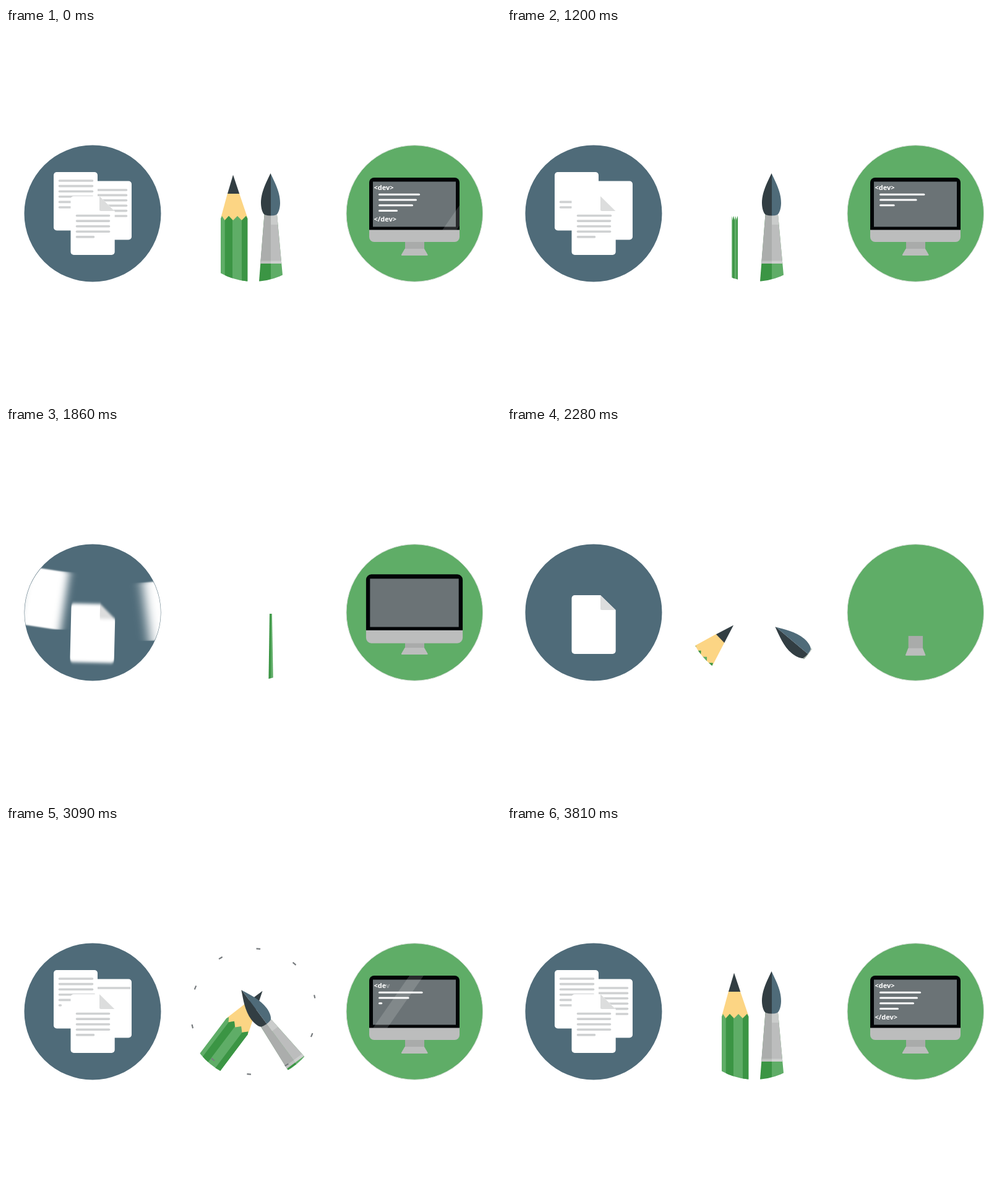
An HTML page that plays this animation: 800 by 600 pixels, repeating every 4500 ms.

```html
<!DOCTYPE html>
<html lang="en">
<head>
<meta charset="utf-8">
<title>Content, design, development</title>
<style>
  html, body { margin: 0; width: 100%; height: 100%; overflow: hidden; background: #fff; }
  svg { display: block; width: 100vw; height: 100vh; }
  .rules line { stroke: #cfd1d2; stroke-width: 3.6; stroke-linecap: round; }
  .code line { stroke: #fff; stroke-width: 3; stroke-linecap: round; }
  .code text { font: bold 11px "Open Sans", "Noto Sans", sans-serif; fill: #fff; }
  .burst { fill: none; stroke: #777b7e; stroke-width: 2.2; }
</style>
</head>
<body>
<svg viewBox="0 0 800 600">
  <defs>
    <clipPath id="leftDisc"><circle cx="140" cy="300" r="110"/></clipPath>
    <clipPath id="midDisc"><circle cx="400" cy="300" r="110"/></clipPath>
    <clipPath id="handleShape"><path d="M417.5 302H438L448 411H408.5Z"/></clipPath>
    <clipPath id="bezelShape"><path id="bezelPath" d="M587 326.500V250a8 8 0 0 1 8-8H725a8 8 0 0 1 8 8V326.500Z"/></clipPath>
    <filter id="blur1" filterUnits="userSpaceOnUse" x="-100" y="100" width="500" height="450"><feGaussianBlur stdDeviation="0"/></filter>
    <filter id="blur2" filterUnits="userSpaceOnUse" x="-100" y="100" width="500" height="450"><feGaussianBlur stdDeviation="0"/></filter>
    <filter id="blur3" filterUnits="userSpaceOnUse" x="-100" y="100" width="500" height="450"><feGaussianBlur stdDeviation="0"/></filter>
  </defs>

  <circle cx="140" cy="300" r="110.5" fill="#4f6b79"/>
  <g clip-path="url(#leftDisc)">
    <g id="sheet2">
      <g class="pose"><rect x="132" y="247.500" width="71" height="95" rx="5" fill="#fff"/><g class="rules"></g></g>
    </g>
    <g id="sheet1">
      <g class="pose"><rect x="77" y="233" width="71" height="94.500" rx="5" fill="#fff"/><g class="rules"></g></g>
    </g>
    <g id="sheet3">
      <g class="pose">
        <path d="M109.500 272H151L175.700 296V362a5 5 0 0 1-5 5H109.500a5 5 0 0 1-5-5V277a5 5 0 0 1 5-5Z" fill="#fff"/>
        <path d="M151 272L175.300 296H153a2 2 0 0 1-2-2Z" fill="#dcdddd"/>
        <g class="rules"></g>
      </g>
    </g>
  </g>

  <g clip-path="url(#midDisc)">
    <g id="pencil">
      <g id="pencilHead">
        <path d="M358 267.500H377L390 306L384 314H352L347.500 306Z" fill="#fcd584"/>
        <path d="M367 237.500L377.200 268H358Z" fill="#323e43"/>
      </g>
      <g id="pencilBody">
        <path id="shaft" d="M347 308V570H390.300V308L388 304L381 311L374 304L367 311L360 304L353.500 311L349 304Z" fill="#5fad67"/>
        <path d="M353.700 311L360 304L366 310.500V570H353.700ZM381 311L388 304L390.300 308V570H381Z" fill="#3b9544"/>
      </g>
    </g>
    <g id="brush">
      <g id="handle">
        <path d="M417.500 302H428V600H394Z" fill="#3b9544"/>
        <path d="M428 302H438L465.500 600H428Z" fill="#5fad67"/>
      </g>
      <g id="ferruleClip">
        <g id="ferrule">
          <path d="M417.500 302H428V381H411Z" fill="#abadac"/>
          <path d="M428 302H438L445.300 381H428Z" fill="#bcbdbd"/>
          <path d="M428 302H438L439.500 318H428Z" fill="#cacccb"/>
          <path d="M411.600 376.500H428V381H411.200Z" fill="#bfc1c0"/>
          <path d="M428 376.500H444.900L445.300 381H428Z" fill="#cdcfce"/>
        </g>
      </g>
      <g id="brushHead">
        <path d="M427.500 235C421 249 412 265 412 283C412 292 415 300 418 302Q423 303.500 428 303.500V236Z" fill="#323e43"/>
        <path d="M427.500 235C434 249 443 265 443 283C443 292 440 300 437 302Q433 303.500 428 303.500V236Z" fill="#4f6b79"/>
      </g>
    </g>
    <circle id="burst" class="burst" cx="400" cy="300" r="0"/>
  </g>

  <circle cx="660.300" cy="300" r="110.300" fill="#5fad67" stroke="#d3dcd4" stroke-width="1"/>
  <g id="stand">
    <path d="M645 339H676V358H645Z" fill="#a9abaa"/>
    <path d="M644.500 357H676L681.500 366.500Q682 368 680.500 368H640Q638.500 368 639 366.500Z" fill="#bcbdbd"/>
  </g>
  <g id="monitor">
    <rect x="587" y="300" width="146" height="46" rx="8" fill="#bcbdbd"/>
    <use href="#bezelPath" fill="#020507"/>
    <rect x="593" y="248.500" width="134" height="73" fill="#6b7376"/>
    <g class="code">
      <text x="594.500" y="262" id="openTag"></text>
      <g id="codeLines"></g>
      <text x="594.500" y="313" id="closeTag"></text>
    </g>
    <g clip-path="url(#bezelShape)"><path id="glare" d="M0 327H23L82 242H59Z" fill="#fff" opacity=".15"/></g>
  </g>
</svg>
<script>
const LOOP = 4500, STEP = 30, BACK = 1.70158;
const $ = id => document.getElementById(id);
const progress = (t, start, length) => Math.min(1, Math.max(0, (t - start) / length));
const backIn = p => p * p * ((BACK + 1) * p - BACK);
const backOut = p => 1 - backIn(1 - p);
const cubicOut = p => 1 - (1 - p) ** 3;
const mix = (a, b, p) => a + (b - a) * p;

// 1 while at rest, 0 while away; anticipates on leaving, overshoots on return
const presence = (t, leave, leaveLength, enter, enterLength) =>
  t < enter ? 1 - backIn(progress(t, leave, leaveLength)) : backOut(progress(t, enter, enterLength));

const place = (el, transform) => el.setAttribute('transform', transform);
const scaleAt = (x, y, sx, sy = sx) => `translate(${x} ${y}) scale(${sx} ${sy}) translate(${-x} ${-y})`;
const show = (el, on) => el.setAttribute('visibility', on ? 'visible' : 'hidden');

function makeElement(parent, name, attrs) {
  const el = document.createElementNS('http://www.w3.org/2000/svg', name);
  for (const key in attrs) el.setAttribute(key, attrs[key]);
  return parent.appendChild(el);
}

const strokes = [];
function addStrokes(parent, x, y, gap, lengths, leaves, enters) {
  lengths.forEach((length, i) => {
    const lineY = y + gap * i;
    const el = makeElement(parent, 'line', { x1: x, x2: x, y1: lineY, y2: lineY });
    strokes.push({ el, x, length, leave: leaves[i], enter: enters[i] });
  });
}
const series = (first, gap, n) => Array.from({ length: n }, (_, i) => first + gap * i);

const letters = [];
function addLetters(id, text, leave, enter) {
  [...text].forEach((char, i) => {
    const el = makeElement($(id), 'tspan', {});
    el.textContent = char;
    letters.push({ el, leave: leave - 60 * i, enter: enter + 60 * i });
  });
}

const rules = n => document.querySelector(`#sheet${n} .rules`);
addStrokes(rules(1), 86.5, 247, 8.6, [53, 53, 53, 53, 53, 18],
  [747, 598, 765, 850, 930, 1000], [2600, 2690, 2780, 2860, 2955, 3083]);
addStrokes(rules(2), 141.5, 262, 8.4, [53, 53, 53, 53, 53, 53],
  [580, 410, 480, 747, 830, 910], [2916, ...series(3085, 80, 5)]);
addStrokes(rules(3), 114.5, 303.5, 8.6, [52, 52, 52, 52, 27],
  series(1165, 40, 5), series(2400, 70, 5));
addStrokes($('codeLines'), 603.5, 269.3, 8.7, [64, 59, 53, 28],
  series(1080, -75, 4), series(2952, 67, 4));
addLetters('openTag', '<dev>', 1605, 2920);
addLetters('closeTag', '</dev>', 810, 3480);

const sheets = [
  { n: 1, cx: 112.5, cy: 280, dx: -150, dy: -10, turn: 25, leave: 1515, enter: 2300, length: 330 },
  { n: 2, cx: 167.5, cy: 295, dx: 135, dy: 0, turn: -11, leave: 1470, enter: 2420, length: 350 },
  { n: 3, cx: 140.3, cy: 319.5, dx: 0, dy: 150, turn: 15, leave: 1566, enter: 2020, length: 250 }
];
for (const sheet of sheets) {
  sheet.el = $('sheet' + sheet.n);
  sheet.pose = sheet.el.querySelector('.pose');
  sheet.blur = $('blur' + sheet.n).firstElementChild;
}

function drawSheet(sheet, t) {
  const away = time => 1 - presence(time, sheet.leave, 420, sheet.enter, sheet.length);
  const a = away(t), speed = Math.abs(away(t + 12) - away(t - 12));
  const blurX = speed * Math.abs(sheet.dx) * .3, blurY = speed * sheet.dy * .2;
  place(sheet.pose, `translate(${a * sheet.dx} ${a * sheet.dy}) rotate(${a * sheet.turn} ${sheet.cx} ${sheet.cy})`);
  if (blurX + Math.abs(blurY) > .4) {
    sheet.blur.setAttribute('stdDeviation', `${blurX} ${Math.max(0, blurY)}`);
    sheet.el.setAttribute('filter', `url(#blur${sheet.n})`);
  } else sheet.el.removeAttribute('filter');
}

// Poses are [x, y, angle] of a point on the tool's axis
const tools = [
  { el: $('pencil'), far: [182, 468, 57.5], crossed: [330, 379, 37], rest: [367, 378, 0] },
  { el: $('brush'), far: [639.4, 458.3, -67.2], crossed: [464, 377.5, -36.5], rest: [428, 375, 0] }
];

function drawTool({ el, far, crossed, rest }, t) {
  const enter = cubicOut(progress(t, 2160, 500)), settle = backOut(progress(t, 3090, 720));
  const pose = t < 2160 ? rest : rest.map((r, i) => mix(mix(far[i], crossed[i], enter), r, settle));
  place(el, `translate(${pose[0]} ${pose[1]}) rotate(${pose[2]}) translate(${-rest[0]} ${-rest[1]})`);
}

function drawHead(el, x, y, t, leave) {
  const p = t < 2160 ? progress(t, leave, 400) : 0;
  const size = 1 - progress(p, .5, .5) ** 2;
  show(el, size > .01);
  place(el, `rotate(${70 * backIn(p)} ${x} ${y}) ${scaleAt(x, y, size)}`);
}

function narrow(el, x, t, leave, length) {
  const width = t < 2160 ? 1 - progress(t, leave, length) ** 2 : 1;
  show(el, width > .01);
  place(el, scaleAt(x, 0, width, 1));
}

function drawTools(t) {
  tools.forEach(tool => drawTool(tool, t));
  drawHead($('pencilHead'), 368, 308, t, 700);
  drawHead($('brushHead'), 427, 303, t, 1340);
  narrow($('pencilBody'), 368, t, 980, 250);
  narrow($('handle'), 428, t, 1680, 200);

  const slide = t < 2160 ? progress(t, 1400, 300) : 0;
  show($('ferrule'), slide < 1);
  place($('ferrule'), `translate(0 ${130 * slide ** 2})`);
  if (slide > 0) $('ferruleClip').setAttribute('clip-path', 'url(#handleShape)');
  else $('ferruleClip').removeAttribute('clip-path');

  const spread = progress(t, 2850, 500), radius = 20 + 95 * cubicOut(spread);
  const gap = radius * Math.PI / 5, dash = 6.5;
  const burst = $('burst');
  show(burst, spread > 0 && spread < 1);
  burst.setAttribute('r', radius);
  burst.setAttribute('stroke-dasharray', `${dash} ${gap - dash}`);
  burst.setAttribute('stroke-dashoffset', dash / 2);
  place(burst, 'rotate(-14 400 300)');
}

function drawMonitor(t) {
  const size = presence(t, 1780, 300, 2350, 350);
  show($('monitor'), size > .01);
  place($('monitor'), scaleAt(660, 294, size));

  const sx = presence(t, 1950, 200, 2225, 250), sy = presence(t, 1950, 200, 2140, 250);
  show($('stand'), sx > .01 && sy > .01);
  place($('stand'), scaleAt(660, 350, sx, sy));

  const sweep = 1615;
  place($('glare'), `translate(${705 + .8 * ((t + 300) % sweep - 300)} 0)`);
}

function draw(t) {
  for (const { el, x, length, leave, enter } of strokes) {
    const amount = presence(t, leave, 300, enter, 300);
    show(el, amount > .005);
    el.setAttribute('x2', x + length * amount + .01);
  }
  for (const { el, leave, enter } of letters) {
    const shown = t < 2160 ? 1 - progress(t, leave - 30, 60) : progress(t, enter - 30, 60);
    el.setAttribute('fill-opacity', shown);
  }
  sheets.forEach(sheet => drawSheet(sheet, t));
  drawTools(t);
  drawMonitor(t);
}

let start;
function frame(now) {
  start ??= now;
  const t = (now - start) % LOOP;
  draw(Math.floor(t / STEP + 1e-6) * STEP);
  requestAnimationFrame(frame);
}
draw(0);
requestAnimationFrame(frame);
</script>
</body>
</html>
```
